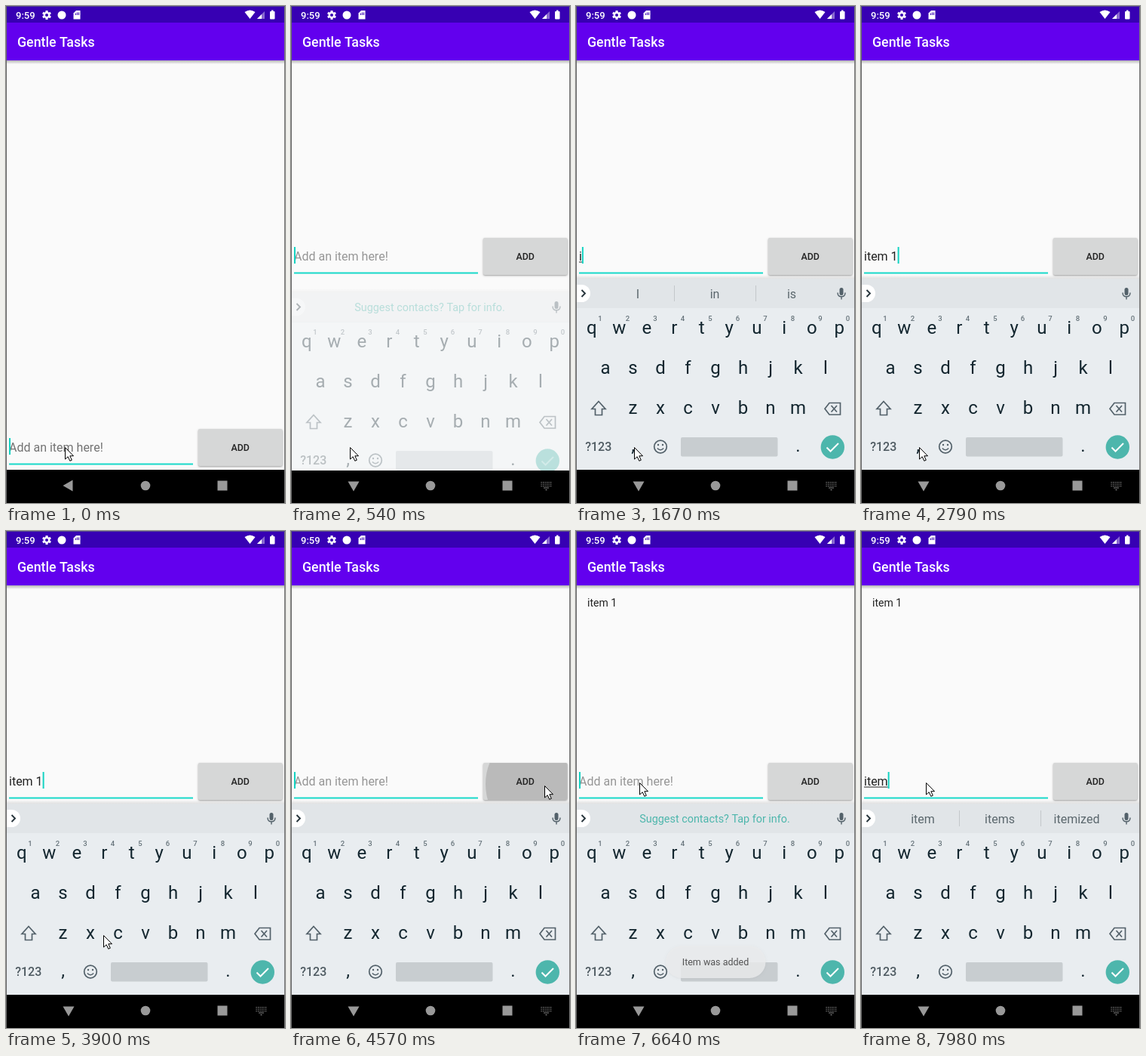
These frames come from a looping animation (370x658 px, 8000 ms). An HTML page with a canvas:

```html
<!DOCTYPE html>
<html lang="en">
<head>
<meta charset="utf-8">
<title>Gentle Tasks</title>
<style>
html, body { margin: 0; width: 100%; height: 100%; overflow: hidden; background: #fafafa; }
canvas { display: block; width: 370px; height: 658px; }
</style>
</head>
<body>
<canvas id="stage"></canvas>
<script>
const W = 370, H = 658, LOOP = 8000;
const canvas = document.getElementById('stage');
const dpr = window.devicePixelRatio || 1;
canvas.width = W * dpr;
canvas.height = H * dpr;
const c = canvas.getContext('2d');
c.scale(dpr, dpr);

// Stepped timelines: [start ms, value, ...]
const CONTACTS = 'Suggest contacts? Tap for info.';
const ITEM_WORDS = 'item|items|itemized';
const typed = [[0, ''], [1550, 'i'], [1680, 'it'], [1810, 'ite'], [1940, 'item'], [2400, 'item '],
  [2660, 'item 1'], [4570, ''], [7450, 'i'], [7830, 'ite'], [7980, 'item']];
const words = [[0, CONTACTS], [1550, 'I|in|is'], [1680, "it|it's|its"], [1810, ITEM_WORDS],
  [2400, 'is|and|in'], [2660, ''], [4820, CONTACTS], [7830, ITEM_WORDS]];
const caretFlips = [1280, 1550, 3220, 3780, 4290, 4570, 5080, 5500, 5930, 6360, 6910, 7450];
const keyboardIn = [[0, 0, 0], [420, .35, 18], [560, .75, 6], [690, .92, 1.2], [840, 1, 0]];
const itemAlpha = [[0, 0], [4690, .45], [4820, 1]];
const toastAlpha = [[0, 0], [4820, .3], [4950, .75], [5080, 1], [6360, .97], [6500, .9],
  [6640, .8], [6790, .3], [6910, 0]];
const ripple = [[0, 0, 0], [4570, 75, 1], [4690, 130, 1], [4820, 130, .5], [4950, 0, 0]];
// Pointer moves: start, end, steps, x, y
const moves = [[690, 840, 2, 77, 584], [3780, 4290, 5, 336, 337], [4950, 5380, 4, 89, 343],
  [5500, 5500, 1, 84, 338], [5620, 5930, 3, 84, 333], [7180, 7330, 2, 86, 333]];

const at = (list, t) => list.filter(s => s[0] <= t).pop();

function pointerAt(t) {
  let x = 78, y = 584;
  for (const [start, end, n, toX, toY] of moves) {
    if (t < start) break;
    const p = Math.min(n, Math.floor((t - start) / (end - start || 1) * (n - 1)) + 1) / n;
    x += (toX - x) * p;
    y += (toY - y) * p;
  }
  return [Math.round(x), Math.round(y)];
}

function rect(x, y, w, h, color, r = 0) {
  c.fillStyle = color;
  c.beginPath();
  c.roundRect(x, y, w, h, r);
  c.fill();
}

function disc(x, y, r, color) {
  c.fillStyle = color;
  c.beginPath();
  c.arc(x, y, r, 0, 7);
  c.fill();
}

function shape(d, color) {
  c.fillStyle = color;
  c.fill(new Path2D(d));
}

function line(d, color, width) {
  c.strokeStyle = color;
  c.lineWidth = width;
  c.stroke(new Path2D(d));
}

function text(s, x, y, size, color, align = 'left', weight = 400) {
  c.font = `${weight} ${size}px Roboto, sans-serif`;
  c.textAlign = align;
  c.fillStyle = color;
  c.fillText(s, x, y);
}

function fade(x, y, w, h, from) {
  const g = c.createLinearGradient(0, y, 0, y + h);
  g.addColorStop(0, from[0]);
  g.addColorStop(1, from[1]);
  rect(x, y, w, h, g);
}

function withAlpha(a, draw) {
  if (!a) return;
  c.save();
  c.globalAlpha = a;
  draw();
  c.restore();
}

function header() {
  rect(0, 0, W, 22, '#3700b3');
  rect(0, 22, W, 50, '#6200ee');
  fade(0, 72, W, 5, ['rgba(0,0,0,.28)', 'rgba(0,0,0,0)']);
  text('Gentle Tasks', 15, 54, 17.8, '#fff', 'left', 500);
  text('9:59', 13, 16.5, 13, '#fff', 'left', 500);
  for (let i = 0; i < 6; i++) {
    const a = i * Math.PI / 3 + Math.PI / 6, dx = Math.cos(a), dy = Math.sin(a);
    line(`M54 12L${54 + dx * 6} ${12 + dy * 6}`, '#fff', 3);
  }
  disc(54, 12, 4.4, '#fff');
  disc(54, 12, 2, '#3700b3');
  disc(74, 12, 5.5, '#fff');
  shape('M93 6H98.5V17.5H89.5V9.5Z', '#fff');
  line('M92.5 9.5V12M94.5 8.5V12M96.5 8.5V12', '#3700b3', 1);
  shape('M316.5 8Q323.5 3 330.5 8L323.5 17Z', '#fff');
  shape('M343 7V17H333Z', '#8a6ad0');
  shape('M339 11V17H333Z', '#fff');
  rect(350, 7, 6.5, 10.5, '#fff', 1);
  rect(352, 5.5, 2.5, 2, '#fff');
}

function inputRow(t, y) {
  const value = at(typed, t)[1];
  const hint = t < 150 ? '#737373' : '#969696';
  text(value || 'Add an item here!', 4, y + 30, 16, value ? '#212121' : hint);
  const end = value ? c.measureText(value).width : 0;
  if (value && !value.includes(' ')) rect(4, y + 31.5, end, 1, '#212121');
  if (caretFlips.filter(f => f <= t).length % 2 === 0) rect(4 + end, y + 12, 2, 22, '#12d3c2');
  rect(4, y + 45.4, 244, 2, '#19d9ca');

  c.save();
  c.shadowColor = 'rgba(0,0,0,.38)';
  c.shadowBlur = 2.5 * dpr;
  c.shadowOffsetY = dpr;
  rect(255, y, 111.5, 49, '#d6d7d7', 2);
  c.restore();
  const [, radius, strength] = at(ripple, t);
  withAlpha(strength, () => {
    c.beginPath();
    c.roundRect(255, y, 111.5, 49, 2);
    c.clip();
    disc(333, y + 28, radius, '#bababa');
  });
  text('ADD', 310.7, y + 29, 12.4, '#222', 'center', 500);
}

function suggestions(t) {
  const list = at(words, t)[1].split('|');
  if (list.length === 1) return text(list[0], 184, 386, 14.4, '#4db6ac', 'center');
  list.forEach((w, i) => text(w, [82, 184, 286][i], 386.5, 16, '#5b676d', 'center'));
  rect(130, 370, 1, 21, '#c3c8cb');
  rect(238, 370, 1, 21, '#c3c8cb');
}

function keyboard(t) {
  const ink = '#13262f', icon = '#53616a';
  fade(0, 356, W, 5, ['rgba(0,0,0,0)', 'rgba(0,0,0,.1)']);
  rect(0, 361, W, 40, '#e1e5e8');
  rect(0, 400, W, 214, '#e9edf0');
  rect(0, 369, 19, 23, '#fff', [0, 11.5, 11.5, 0]);
  line('M7.5 376L12 380.5L7.5 385', '#26343b', 1.9);
  suggestions(t);

  rect(349.5, 373, 5, 10, icon, 2.5);
  line('M347 379.5Q347 384.8 352 384.8Q357 384.8 357 379.5M352 385V388.5', icon, 1.4);

  // Every letter row is centred on the same axis
  ['qwertyuiop', 'asdfghjkl', 'zxcvbnm'].forEach((row, r) => [...row].forEach((ch, i) =>
    text(ch, 185 + 36.5 * (i - (row.length - 1) / 2), 434 + 52.8 * r, 24, ink, 'center')));
  [...'1234567890'].forEach((n, i) => text(n, 32 + 36.5 * i, 416.5, 9.5, '#66737a', 'center', 500));

  line('M30 523.5L39 533.5H34.5V541.5H25.5V533.5H21Z', icon, 1.7);
  line('M336 525.5H350.5V541H336L330 533.2Z', icon, 1.7);
  line('M338.5 529L346 537.5M346 529L338.5 537.5', icon, 1.7);

  text('?123', 29.7, 589, 16, '#4f5b62', 'center', 500);
  text(',', 75.5, 590, 24, ink, 'center');
  text('.', 294.5, 590, 24, ink, 'center');
  c.strokeStyle = icon;
  c.lineWidth = 1.7;
  c.beginPath();
  c.arc(112, 583.5, 8.3, 0, 7);
  c.stroke();
  disc(109, 581, 1.2, icon);
  disc(115, 581, 1.2, icon);
  line('M107.8 585.5Q112 590 116.2 585.5', icon, 1.5);
  rect(139, 571, 128.5, 25.5, '#c8cdd0', 2);
  disc(340.3, 584, 15.7, '#4db6ac');
  line('M332.5 584.5L337.5 589.5L348 579', '#fff', 2);
}

function navBar(open, top) {
  const gray = '#999';
  rect(0, top, W, H - top, '#000');
  shape(open ? 'M75.5 629.5H90.5L83 642.5Z' : 'M75.5 635L88.5 627.5V642.5Z', gray);
  disc(185, 635, 6.3, gray);
  rect(280.5, 628.5, 13, 13, gray);
  if (!open) return;
  for (let r = 0; r < 3; r++) {
    for (let i = 0; i < 6; i++) rect(331.5 + i * 2.5, 630 + r * 2.5, 1.2, 1.2, '#888');
  }
  rect(335, 637.5, 7, 1, '#888');
  shape('M337 640H340L338.5 641.5Z', '#888');
}

function toast() {
  c.shadowColor = 'rgba(0,0,0,.06)';
  c.shadowBlur = 3 * dpr;
  c.shadowOffsetY = dpr;
  rect(119, 549, 132.5, 43, '#ecedee', 21.5);
  c.shadowColor = 'transparent';
  text('Item was added', 185, 575, 12.5, '#2f2f2f', 'center');
}

function pointer([x, y]) {
  c.save();
  c.translate(x + .5, y + .5);
  const d = 'M0 0V15.5L3.7 12.2L6.3 17.8L8.8 16.7L6.3 11.2H11Z';
  shape(d, '#fff');
  line(d, '#000', 1);
  c.restore();
}

function draw(t) {
  const open = t >= 420;
  rect(0, 0, W, H, '#fafafa');
  header();
  withAlpha(at(itemAlpha, t)[1], () => text('item 1', 15, 99.5, 14, '#212121'));
  inputRow(t, open ? 307 : 560);
  const [, alpha, drop] = at(keyboardIn, t);
  withAlpha(alpha, () => {
    c.translate(0, drop);
    keyboard(t);
  });
  navBar(open, 614 + Math.min(drop, 1));
  withAlpha(at(toastAlpha, t)[1], toast);
  rect(0, 0, 1, H, '#666');
  rect(369, 0, 1, H, '#777');
  rect(0, 0, W, 1, '#55458a');
  pointer(pointerAt(t));
}

const began = performance.now();
function tick() {
  draw((performance.now() - began) % LOOP);
  requestAnimationFrame(tick);
}
tick();
</script>
</body>
</html>
```
